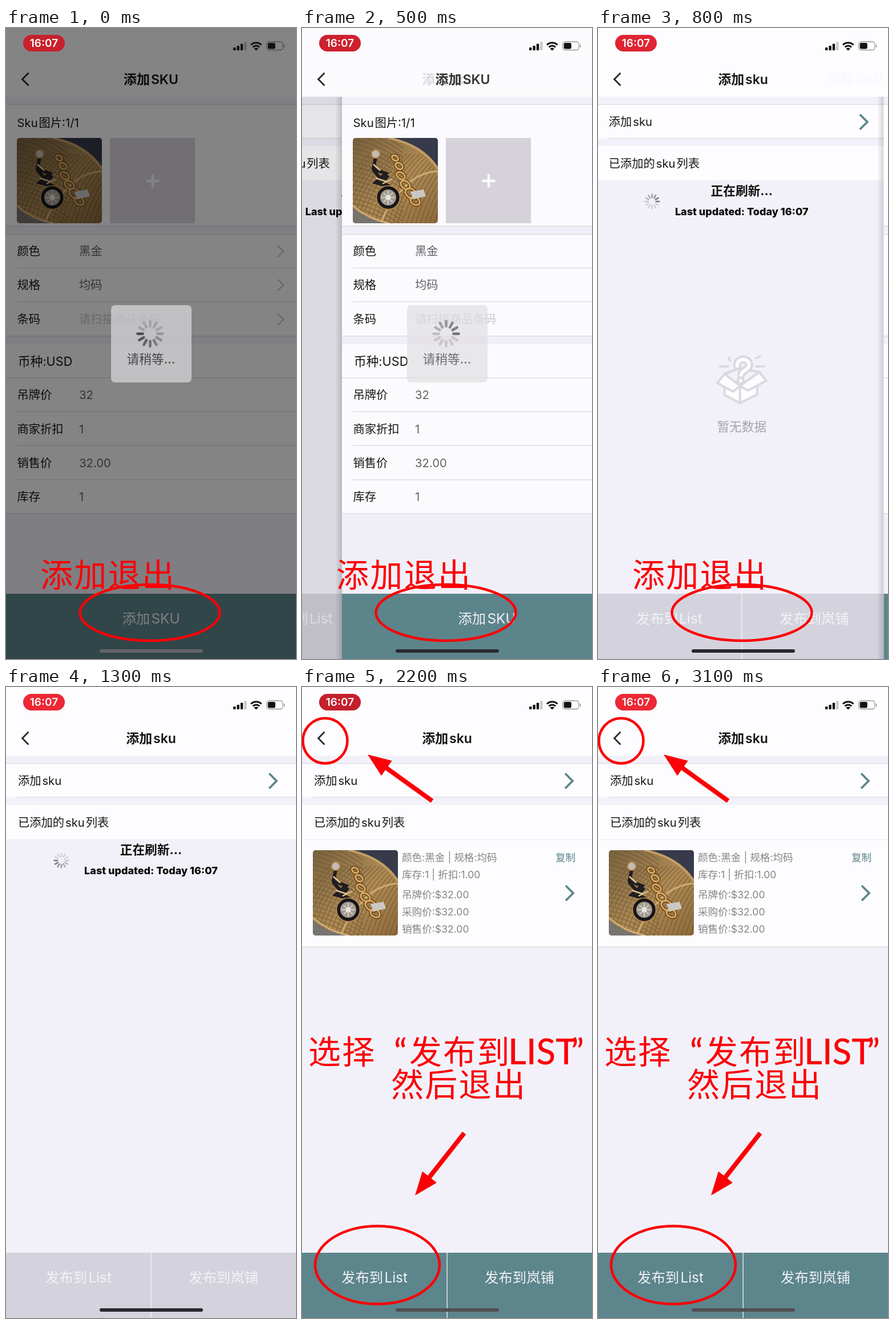
Recreate the animation shown at these times as an HTML page. Size 508 by 1102 pixels, loop 3200 ms.

```html
<!DOCTYPE html>
<html lang="zh-CN">
<head>
<meta charset="utf-8">
<title>添加 SKU</title>
<style>
html, body { margin: 0; width: 100%; height: 100%; overflow: hidden; background: #fdfcfe; }
svg { display: block; width: 508px; height: 1102px; }
text { font-family: Inter, "Noto Sans CJK SC", "Noto Sans CJK", sans-serif; white-space: pre; }
.note text { font-family: "Noto Sans CJK SC", "Noto Sans CJK", sans-serif; font-size: 57px; font-weight: 500; letter-spacing: 2.3px; }
.note .latin { font-family: Lato, sans-serif; font-size: 62px; letter-spacing: 0; }
</style>
</head>
<body>
<svg id="stage" viewBox="0 0 508 1102"></svg>
<script>
const W = 508, LOOP = 3200;
const WHITE = '#fdfcfe', BAND = '#f2f1f9', LINE = '#dad9de', TEAL = '#5d858c', RED = '#fb0007', INK = '#161617';

const rect = (x, y, w, h, fill, extra = '') =>
  `<rect x="${x}" y="${y}" width="${w}" height="${h}" fill="${fill}" ${extra}/>`;
const stroke = (d, color, width, extra = '') =>
  `<path d="${d}" fill="none" stroke="${color}" stroke-width="${width}" ${extra}/>`;
const rule = (y, x = 0) => rect(x, y - .6, W - x, 1.2, LINE);
const group = (id, body, extra = '') => `<g id="${id}" ${extra}>${body}</g>`;
// A hair space separates Chinese from Latin words.
const spaced = s => s.replace(/([一-龥])(?=[a-z])|([a-z])(?=[一-龥])/gi, '$&\u200a');
const text = (x, y, size, s, fill = INK, extra = '') =>
  `<text x="${x}" y="${y}" font-size="${size}" fill="${fill}" ${extra}>${spaced(s)}</text>`;
const mid = (x, y, size, s, fill, weight = 400) =>
  text(x, y, size, s, fill, `text-anchor="middle" font-weight="${weight}"`);
const chevron = (x, y, r, color, width) =>
  stroke(`M${x} ${y - r}l${r} ${r}l${-r} ${r}`, color, width);
const ellipse = (x, y, rx, ry) =>
  `<ellipse cx="${x}" cy="${y}" rx="${rx}" ry="${ry}" fill="none" stroke="${RED}" stroke-width="4.5"/>`;
const arrow = (x, y, angle) =>
  `<path d="M0 0L41-16V-4H139V4H41V16Z" fill="${RED}" transform="translate(${x} ${y}) rotate(${angle})"/>`;
const photo = (x, y) => `<use href="#photo" x="${x}" y="${y}"/>`;

function spinner(id, x, y, inner, outer, width, color) {
  let s = '';
  for (let i = 0; i < 12; i++)
    s += `<path d="M0 ${-inner}V${-outer}" transform="rotate(${i * 30})"/>`;
  return group(id, s, `transform="translate(${x} ${y})" stroke="${color}" stroke-width="${width}" stroke-linecap="round"`);
}

function photoArt() {
  let ribs = '';
  for (let i = -6; i < 24; i++) {
    const y = i * 8;
    ribs += `M-4 ${y + 25}Q45 ${y + 34} 88 ${y + 66}`;
    ribs += `M${i * 8} 175Q${i * 8 + 20} 80 ${i * 8 + 78} 28`;
  }
  const loops = [[74, 35, 6], [81, 49, 7], [84, 66, 8], [92, 82, 9], [102, 97, 11], [109, 110, 9]]
    .map(([x, y, r]) => `<ellipse cx="${x}" cy="${y}" rx="${r}" ry="${r * .7}" transform="rotate(35 ${x} ${y})"/>`).join('');
  return `<defs>
    <linearGradient id="gold" x2="1" y2="1"><stop stop-color="#77613f"/><stop offset=".55" stop-color="#b08b55"/><stop offset="1" stop-color="#8d6a3c"/></linearGradient>
    <linearGradient id="edge"><stop stop-color="#000" stop-opacity="0"/><stop offset="1" stop-color="#000" stop-opacity=".16"/></linearGradient>
    <clipPath id="frame"><rect width="149" height="149" rx="5"/></clipPath>
    <g id="photo" clip-path="url(#frame)">
      ${rect(0, 0, 149, 149, 'url(#gold)')}
      ${stroke(ribs, '#66502f', 1.6, 'opacity=".55"')}
      ${stroke('M149 58Q115 60 90 86T48 149', '#d0ad74', 3)}
      <path d="M66 0Q122 10 149 50V0Z" fill="#363a4b"/>
      ${stroke('M62 0Q120 11 149 54', '#c39c63', 4)}
      <path d="M0 122Q24 143 58 149H0Z" fill="#77736f"/>
      ${stroke('M0 118Q26 141 64 149', '#d1ad76', 3)}
      ${stroke('M40 34L36 54L58 62L40 78L64 84M36 56L58 82M62 66L46 82', '#211d20', 6)}
      ${stroke('M36 46L48 57M40 70L58 76M52 80L68 72', '#dfc594', 2.5)}
      <circle cx="40" cy="28" r="7" fill="#c2bdbb" stroke="#bd8f50" stroke-width="2"/>
      <g fill="none" stroke="#6c431b" stroke-width="6">${loops}</g>
      <g fill="none" stroke="#d7ac61" stroke-width="3">${loops}</g>
      <path d="M101 94L124 90L128 102L106 107Z" fill="#ccc9c5"/>
      <circle cx="62" cy="104" r="17" fill="#a49b91" stroke="#17161a" stroke-width="6"/>
      <circle cx="62" cy="104" r="20.5" fill="none" stroke="#b98e52" stroke-width="1.5"/>
      ${stroke('M50 104H74M62 92V116M54 96L70 112M70 96L54 112', '#dedad5', 1.5)}
      <circle cx="62" cy="104" r="4.5" fill="#e8e5e0"/>
    </g></defs>`;
}

function emptyBox() {
  const c = '#dad9e0', mark = 'M246 590C245 575 268 576 267 589C266 598 254 597 253 606';
  return group('empty',
    `<g fill="${WHITE}" stroke="${c}" stroke-width="4" stroke-linejoin="round" stroke-linecap="round">
      <path d="M224 625V641L251 655L281 640V624"/>
      <path d="M224 604L251 594L285 601L251 625Z" fill="${BAND}"/>
      <path d="M224 604L251 625L239 635L211 620Z"/><path d="M285 601L251 625L265 633L297 616Z"/>
      <path d="M251 625V655M216 591H230M279 591H293M231 576L234 581M279 577L286 573"/></g>` +
    stroke(mark, c, 14, 'stroke-linecap="round"') + stroke(mark, WHITE, 6, 'stroke-linecap="round"') +
    `<circle cx="252" cy="616" r="5" fill="${WHITE}" stroke="${c}" stroke-width="4"/>` +
    mid(254, 704, 21.7, '暂无数据', '#a5a3a9'));
}

function listPage() {
  const info = [['颜色:黑金 | 规格:均码', 304], ['库存:1 | 折扣:1.00', 334], ['吊牌价:$32.00', 369],
    ['采购价:$32.00', 399], ['销售价:$32.00', 429]];
  return group('list',
    rect(0, 120, W, 982, BAND) +
    group('refresh', spinner('small', 97, 303, 7, 12.5, 2.6, '#77767a') +
      mid(254, 292, 21.7, '正在刷新...', '#111', 700) +
      mid(254, 327, 18, 'Last updated: Today 16:07', '#050505', 800)) +
    emptyBox() +
    group('row', rect(0, 266, W, 188, WHITE) + rule(266) + rule(454) + photo(19, 285) +
      info.map(([s, y]) => text(175, y, 17.6, s, '#858487')).join('') +
      text(444, 304, 17.6, '复制', TEAL) + chevron(462, 360, 13, TEAL, 3.8)) +
    rect(0, 120, W, 13, BAND) + rect(0, 133, W, 60, WHITE) + rule(133.5) + rule(192.5, 19) +
    rect(0, 193, W, 13, BAND) + rect(0, 206, W, 60, WHITE) +
    text(21, 171, 20.3, '添加sku') + chevron(461, 164, 13, TEAL, 3.8) +
    text(21, 244, 20.3, '已添加的sku列表') +
    rect(0, 988, W, 114, TEAL, 'id="bar"') + rect(253.5, 988, 1.3, 114, '#f4f4f8') +
    mid(127, 1040, 24.4, '发布到List', '#f1f2f6') + mid(381, 1040, 24.4, '发布到岚铺', '#f1f2f6'));
}

function formPage() {
  const rows = [['颜色', '黑金', 397], ['规格', '均码', 456], ['条码', '请扫描商品条码', 516],
    ['吊牌价', '32', 648], ['商家折扣', '1', 708], ['销售价', '32.00', 767], ['库存', '1', 826]];
  return group('form',
    rect(-12, 120, 12, 982, 'url(#edge)') + rect(0, 120, W, 982, BAND) +
    rect(0, 134, W, 212, WHITE) + rect(0, 361, W, 177, WHITE) + rect(0, 552, W, 296, WHITE) +
    [133.5, 346, 360.5, 538, 611, 848].map(y => rule(y)).join('') +
    [419, 478, 670, 729, 789].map(y => rule(y, 19)).join('') +
    text(19.5, 173, 20.3, 'Sku图片:1/1') + photo(19, 192) +
    rect(182, 192, 149, 149, '#d7d5db') + stroke('M245.5 267H268.5M257 255.5V278.5', WHITE, 4.5) +
    rows.map(([k, v, y], i) => text(19.5, y, 20.3, k) +
      text(128, y, 20.3, v, i == 2 ? '#c7c6cb' : '#646367')).join('') +
    [390, 449, 509].map(y => chevron(476, y, 10, '#c2c1c6', 2.2)).join('') +
    text(21, 590, 21.7, '币种:USD') +
    rect(0, 988, W, 114, TEAL) + mid(254, 1040, 24.4, '添加SKU', '#f1f2f6'));
}

function statusBar() {
  const bars = [5, 8, 11.5, 15].map((h, i) =>
    rect(398 + i * 6.4, 39 - h, 4.4, h, i == 3 ? '#00000033' : '#111', 'rx="1"')).join('');
  return rect(30, 12, 73, 29, '#000', 'id="pill" rx="14.5"') + mid(66.5, 33, 19, '16:07', '#fff', 600) + bars +
    stroke('M429 29.5A13 13 0 0 1 447.500 29.500M432.500 33.500A8 8 0 0 1 444 33.500', '#111', 3) +
    '<path d="M438.200 39.500L434.500 36A5.300 5.300 0 0 1 442 36Z" fill="#111"/>' +
    rect(456.5, 24, 28.500, 14.500, 'none', 'rx="4.5" stroke="#000" stroke-opacity=".4" stroke-width="1.3"') +
    rect(458.7, 26, 13, 10.5, '#111', 'rx="2.3"') + rect(486.7, 29, 1.6, 5, '#00000066', 'rx=".8"');
}

const stage = document.getElementById('stage');
stage.innerHTML = photoArt() + listPage() + rect(0, 120, W, 982, '#000', 'id="shade"') + formPage() +
  rect(0, 0, W, 120, WHITE) + stroke('M39.500 78.500L28.500 89.500L39.500 100.500', '#222224', 2.7) +
  group('newTitle', mid(254, 97.5, 23, '添加sku', INK, 600)) +
  group('oldTitle', mid(254, 97.5, 23, '添加SKU', INK, 600)) +
  rect(0, 0, W, 1102, '#000', 'id="dim"') + statusBar() +
  group('hud', rect(184, 484, 141, 135, '#e0dfe2', 'rx="7" fill-opacity=".667"') +
    group('hudInk', spinner('big', 252.5, 534, 13, 22, 4.6, '#4c4b4e') +
      mid(254, 586, 21.7, '请稍等...', '#454447', 500))) +
  rect(164, 1085, 181, 6, '#000', 'id="home" rx="3"') +
  group('note1', `<text x="60" y="976">添加退出</text>` + ellipse(252, 1021, 122.5, 49), `class="note" fill="${RED}"`) +
  group('note2', `<text x="11" y="658">选择</text><text x="188" y="658">发布到</text><text x="156" y="715">然后退出</text>
    <text class="latin" x="161" y="659">“</text><text class="latin" x="361" y="659">LIST</text><text class="latin" x="471" y="659">”</text>` +
    ellipse(40.5, 94, 39, 39.5) + ellipse(132, 1009.5, 109, 68) + arrow(115, 118, 35.6) + arrow(198, 888, -51.7),
    `class="note" fill="${RED}"`);

const $ = id => document.getElementById(id);
const set = (id, name, value) => $(id).setAttribute(name, value);
const show = (id, on) => set(id, 'visibility', on ? 'visible' : 'hidden');
const clamp = v => Math.min(1, Math.max(0, v));
const ease = v => (v = clamp(v), v * v * (3 - 2 * v));
const mix = (a, b, k) => `rgb(${a.map((v, i) => Math.round(v + (b[i] - v) * k))})`;
const spin = (id, lead) => [...$(id).children].forEach((spoke, i) =>
  spoke.setAttribute('opacity', 1 - .75 * Math.min(1, ((lead - i) % 12 + 12) % 12 / 7)));

function draw(t) {
  // Critically damped page slide with parallax beneath.
  const k = Math.max(0, t - 465) * .0185;
  const slide = 1 - (1 + k) * Math.exp(-k);
  const lit = (1 - Math.cos(Math.PI * clamp(t / 540))) / 2;
  const loaded = t > 1300;

  set('form', 'transform', `translate(${slide * W} 0)`);
  show('form', t < 1200);
  set('list', 'transform', `translate(${-.3 * W * (1 - slide)} 0)`);
  set('shade', 'opacity', .1 * (1 - slide));
  set('oldTitle', 'transform', `translate(${200 * slide} 0)`);
  set('oldTitle', 'opacity', 1 - slide);
  set('newTitle', 'opacity', slide);
  set('dim', 'opacity', .48 * (1 - lit));
  set('hud', 'opacity', 1 - clamp((t - 500) / 180));
  set('hudInk', 'opacity', 1 - .25 * lit);

  // The refresh header collapses once the item arrives.
  const gap = 73 * (1 - ease((t - 1310) / 370));
  set('row', 'transform', `translate(0 ${gap})`);
  set('refresh', 'transform', `translate(0 ${gap - 73})`);
  show('row', loaded);
  show('refresh', gap > 0);
  show('empty', t < 1200);
  set('bar', 'fill', loaded ? TEAL : '#d4d3dd');

  const step = Math.floor(t * .012);
  spin('big', step + 9);
  spin('small', step + 6);
  set('pill', 'fill', mix([196, 31, 44], [238, 40, 54], .5 - .5 * Math.cos((t - 200) * Math.PI / 1000)));
  set('home', 'fill', t < 700 ? mix([99, 100, 104], [41, 40, 47], lit)
    : mix([41, 40, 47], [82, 80, 84], ease((t - 1300) / 300)));
  show('note1', t < 1000);
  show('note2', t >= 1500);
}

const start = performance.now();
function tick() {
  draw(Math.floor((performance.now() - start) % LOOP / 100) * 100);
  requestAnimationFrame(tick);
}
tick();
</script>
</body>
</html>
```
